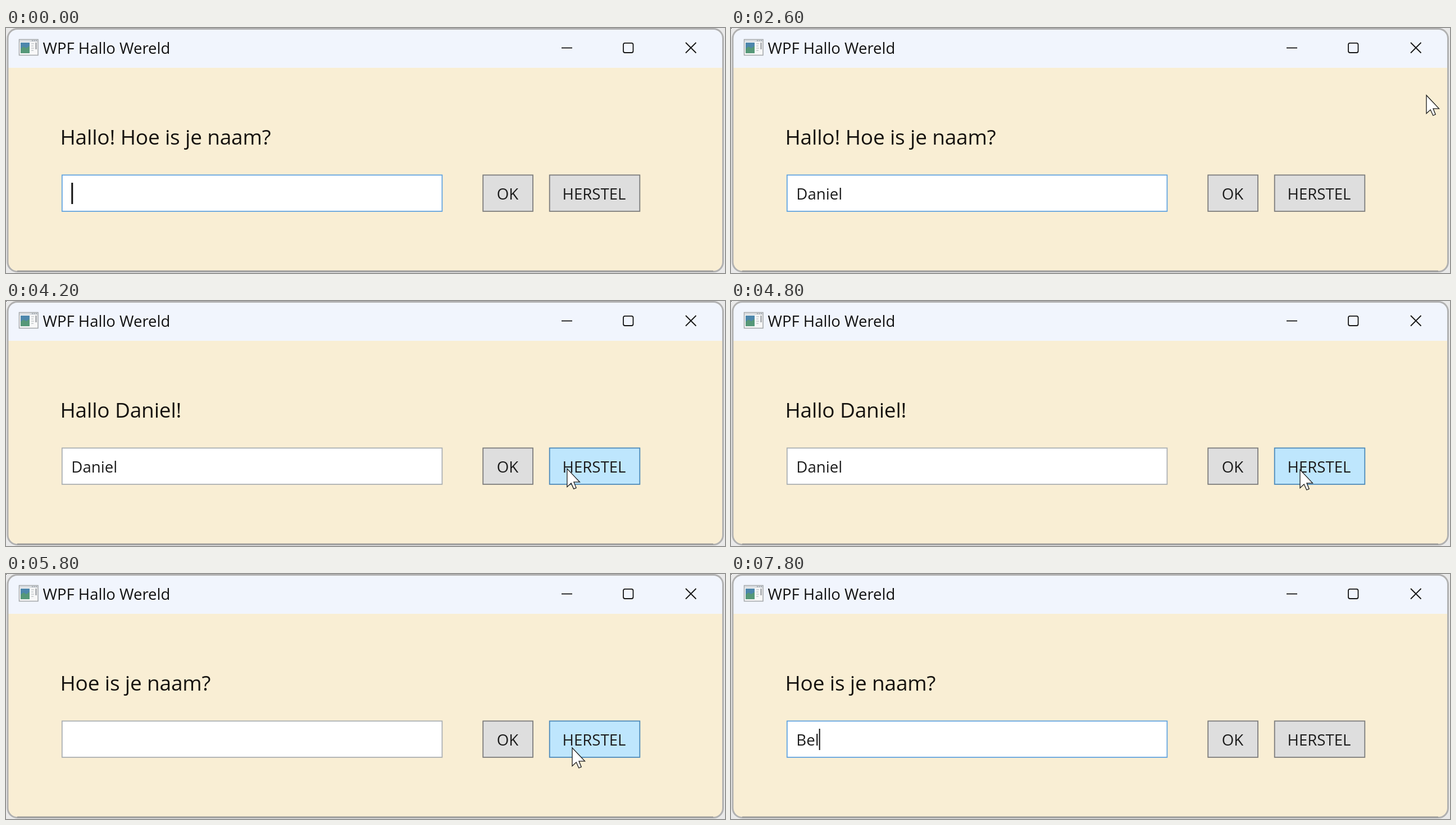
Animation of 1280 by 437 pixels, one loop 8 s. Source, as an HTML page:

```html
<!DOCTYPE html>
<html lang="nl">
<head>
<meta charset="utf-8">
<title>WPF Hallo Wereld</title>
<style>
  html, body { margin: 0; width: 100%; height: 100%; overflow: hidden; background: #e9e9e9; }
  svg { display: block; width: 100%; height: 100%; }
  text { font: 27.6px "Open Sans", "Noto Sans", sans-serif; fill: #1c1c1c; white-space: pre; }
  #label { font-size: 37px; letter-spacing: -.005em; fill: #15120f; }
  .title { font-size: 27.5px; fill: #111; }
  .line { fill: none; stroke: #151515; stroke-width: 1.8; }
  #field { fill: #fff; stroke: #abb0b3; stroke-width: 1.8; }
  #field.hover { stroke: #86b8e8; }
  #field.focus { stroke: #62a4e0; }
  .button rect { fill: #dedede; stroke: #7c7c7c; stroke-width: 1.8; }
  .button.hover rect { fill: #bee6fd; stroke: #4c8aba; }
  #arrow { fill: #fff; stroke: #1b1b1b; stroke-width: 1.3; }
  #beam { fill: none; stroke: #111; stroke-width: 2.6; }
  [hidden] { display: none; }
</style>
</head>
<body>
<svg viewBox="0 0 1280 437" preserveAspectRatio="none">
  <clipPath id="frame"><rect x="3" y="1.5" width="1273.5" height="433" rx="17"/></clipPath>
  <g clip-path="url(#frame)">
    <rect width="1280" height="437" fill="#f9eed4"/>
    <rect width="1280" height="71" fill="#f1f5fd"/>
  </g>
  <rect x="3" y="1.5" width="1273.5" height="433" rx="17" fill="none" stroke="#b1b1b1" stroke-width="3"/>
  <path d="M20 433.5H1259" stroke="#969696" stroke-width="2"/>
  <rect id="speck" width="1" height="1" hidden/>

  <g id="icon">
    <rect x="23.5" y="20.5" width="33.5" height="28" fill="#f8f8f8" stroke="#a3a6a9" stroke-width="1.5"/>
    <path d="M24 23H56" stroke="#d5d9dd" stroke-width="3"/>
    <path d="M46 22.5H55" stroke="#8a929b" stroke-width="1.5" stroke-dasharray="2 1.5"/>
    <rect x="26" y="26" width="16" height="19" fill="#4d87ac"/>
    <path d="M26 37L31 33L36 36L42 32V45H26Z" fill="#569878"/>
    <path d="M45 28H50M45 32H49M45 36H50M45 40H49" stroke="#c4c7ca" stroke-width="1.3"/>
    <path d="M53.5 26V38" stroke="#a2a6aa" stroke-width="2.5"/>
  </g>
  <text class="title" x="65.5" y="46">WPF Hallo Wereld</text>
  <g class="line">
    <path d="M989 35.5H1008"/>
    <rect x="1099" y="26.8" width="17.5" height="17.2" rx="3"/>
    <path d="M1210 26L1228.5 44.5M1228.5 26L1210 44.5"/>
  </g>

  <text id="label" x="96.5" y="208"></text>
  <rect id="field" x="99.8" y="262.3" width="676.6" height="64.6"/>
  <text id="entry" x="116.3" y="306"></text>
  <rect id="caret" y="276" width="2" height="38" fill="#111"/>

  <g id="ok" class="button">
    <rect x="849.2" y="262.3" width="88.8" height="64.6"/>
    <text x="893" y="306" text-anchor="middle">OK</text>
  </g>
  <g id="reset" class="button">
    <rect x="967.7" y="262.3" width="160.6" height="64.6"/>
    <text x="1047" y="306" text-anchor="middle">HERSTEL</text>
  </g>

  <path id="arrow" d="M0 0V32.5L7.2 25.8L11.8 36L16.2 34.2L12 23.8H22.5Z"/>
  <path id="beam" d="M-8.5 -15H-3L0 -12.5L3 -15H8.5M0 -12.5V13M-8.5 15.5H-3L0 13L3 15.5H8.5"/>
</svg>
<script>
const LOOP = 8000, TICK = 200;
const el = id => document.getElementById(id);
const names = ['Daniel', 'Bel'];

const start = {
  label: 'Hallo! Hoe is je naam?', entry: '', caret: true, caretWidth: 3,
  field: 'focus', hover: '', arrow: null, beam: null, speck: false
};

// One key press per tick.
const typing = (name, from) => [...name].map((_, i) =>
  [from + i * TICK, { entry: name.slice(0, i + 1), caret: true, caretWidth: 2, beam: null }]);

// Pointer travel in ticks; bend pulls the path's midpoint vertically.
const travel = (from, steps, [x0, y0], [x1, y1], bend = 0) =>
  Array.from({ length: steps + 1 }, (_, i) => {
    const p = i / steps, e = p * (2 - p);
    return [from + i * TICK, {
      arrow: [x0 + (x1 - x0) * e, y0 + (y1 - y0) * e + bend * 4 * e * (1 - e)]
    }];
  });

const events = [
  [600, { caret: false }],
  ...typing(names[0], 1000),
  [2200, { speck: true }],
  [2600, { caret: false }],
  ...travel(2600, 3, [1238, 120], [866, 294], 15),
  [3200, { caret: true, hover: 'ok' }],
  [3400, { arrow: [861, 300] }],
  [3800, { label: `Hallo ${names[0]}!`, caret: false, field: '' }],
  ...travel(3800, 3, [862, 300], [1016, 299]),
  [4000, { hover: '' }],
  [4200, { hover: 'reset' }],
  ...travel(4600, 1, [1015, 300], [1013, 301]),
  ...travel(5000, 3, [1012, 303], [1008, 310]),
  [5400, { label: 'Hoe is je naam?', entry: '' }],
  [6000, { arrow: [930, 325], hover: '' }],
  [6200, { arrow: [800, 320] }],
  [6400, { arrow: null, beam: [655.5, 302], field: 'hover' }],
  [6800, { field: 'focus', caret: true }],
  [7200, { caret: false }],
  ...typing(names[1], 7400)
];

const show = (node, visible) => node.toggleAttribute('hidden', !visible);

function place(node, point) {
  show(node, point);
  if (point) node.setAttribute('transform', `translate(${point})`);
}

function render(time) {
  const state = Object.assign({}, start,
    ...events.filter(([at]) => at <= time).map(([, change]) => change));
  el('label').textContent = state.label;
  el('entry').textContent = state.entry;
  el('field').setAttribute('class', state.field);
  for (const id of ['ok', 'reset']) el(id).classList.toggle('hover', state.hover === id);
  const width = state.entry ? el('entry').getComputedTextLength() : 0;
  el('caret').setAttribute('x', 116.3 + width);
  el('caret').setAttribute('width', state.caretWidth);
  show(el('caret'), state.caret);
  show(el('speck'), state.speck);
  place(el('arrow'), state.arrow);
  place(el('beam'), state.beam);
}

function frame() {
  render(performance.now() % LOOP);
  requestAnimationFrame(frame);
}
frame();
</script>
</body>
</html>
```
